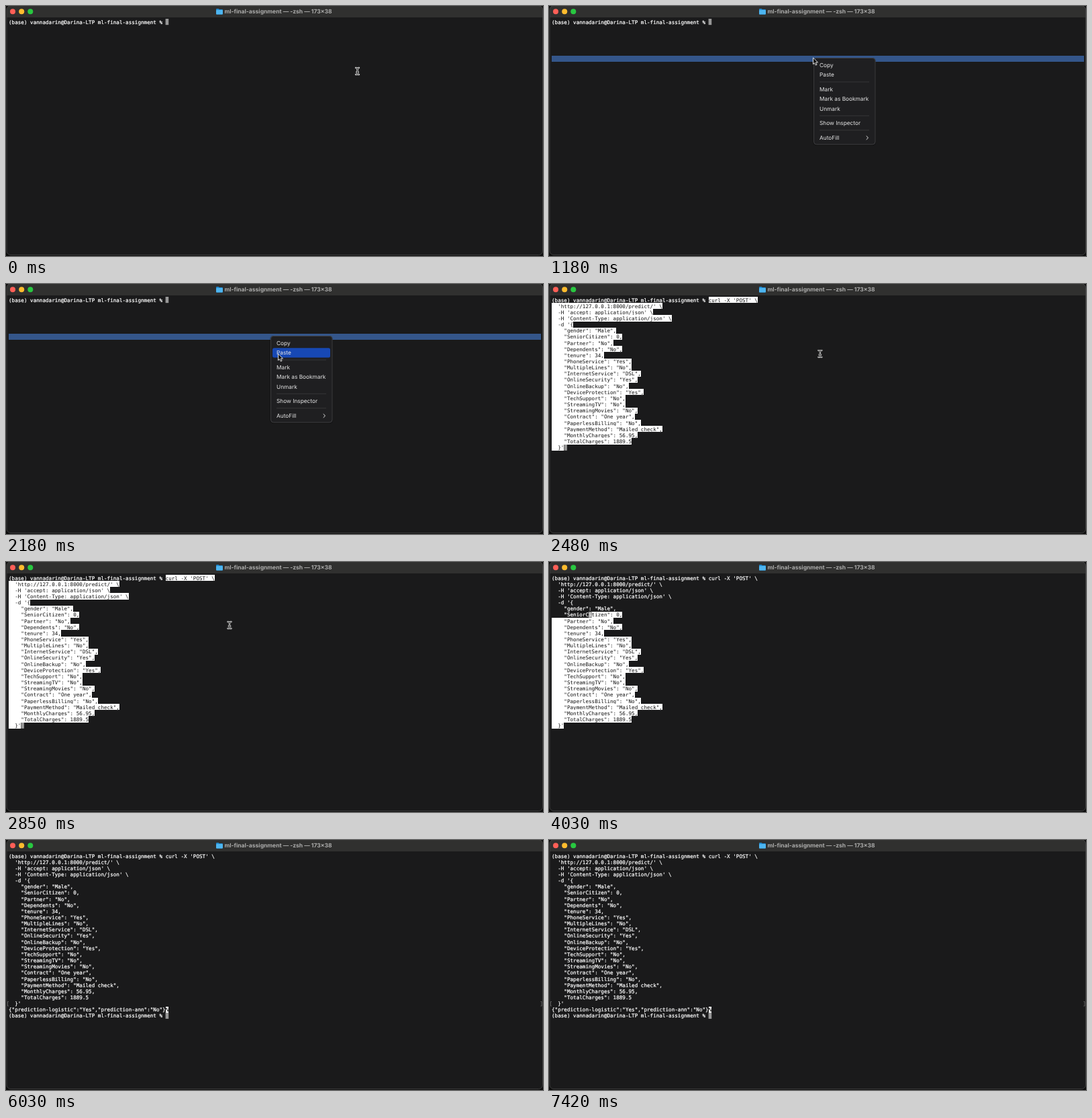
An HTML page for the animation above (7450 ms loop, 800 by 372 pixels).

```html
<!DOCTYPE html>
<html lang="en">
<head>
<meta charset="utf-8">
<title>Terminal</title>
<style>
  html, body { margin: 0; width: 100%; height: 100%; overflow: hidden; background: #0c0c0c; }
  svg { display: block; width: 800px; height: 372px; }
  text { white-space: pre; text-rendering: geometricPrecision; }
  .mono { font: 7.61px "DejaVu Sans Mono", monospace; fill: #fff; }
  .mono text { stroke: #fff; stroke-width: .22px; }
  .mono rect { shape-rendering: crispEdges; }
  .mono .dark { fill: #111; stroke: none; }
  .title { font: 700 8.54px Inter, sans-serif; fill: #acacab; text-anchor: middle; }
  .menu text { font: 8.3px Inter, sans-serif; fill: #e6e6e6; }
</style>
</head>
<body>
<svg viewBox="0 0 800 372">
  <defs>
    <clipPath id="tail"><path id="tailPath"/></clipPath>
  </defs>
  <rect x="1" y="-.5" width="798.5" height="371" rx="6" fill="#1a1a1b"/>
  <path d="M1 17V5.500a6 6 0 0 1 6-6H793.500a6 6 0 0 1 6 6V17Z" fill="#30302f"/>
  <rect x="1" y="-.5" width="798.5" height="371" rx="6" fill="none" stroke="#484848" stroke-width=".8"/>
  <circle cx="10" cy="8.300" r="4" fill="#ff5f57"/>
  <circle cx="23.200" cy="8.300" r="4" fill="#febc2e"/>
  <circle cx="36.300" cy="8.300" r="4" fill="#28c840"/>
  <path d="M313 5.100q0-1 1-1h2.600l1.200 1H322q1 0 1 1v5.400q0 1-1 1h-8q-1 0-1-1Z" fill="#2089cf"/>
  <rect x="313" y="6.100" width="10" height="6.400" rx="1" fill="#4db5f0"/>
  <text class="title" x="405.500" y="11.100">ml-final-assignment — -zsh — 173×38</text>

  <rect id="strip" x="4" y="74" width="793" height="9" fill="#34568a"/>
  <rect id="caret" width="4.600" height="9.150" fill="#979797"/>
  <g id="prompt" class="mono"></g>
  <g id="command" class="mono"></g>
  <g id="pasted" class="mono"></g>
  <path id="marks" d="M4 240.500H2.500V247H4M796.500 240.500H798V247H796.500" fill="none" stroke="#707070" stroke-width=".8"/>
  <g id="reply" class="mono"></g>

  <g id="menu" class="menu">
    <rect x="393" y="77" width="94" height="131" rx="5" fill="#000" opacity=".25"/>
    <rect x="394.500" y="77.500" width="91.500" height="128.500" rx="4" fill="#1f1f21" stroke="#474749" stroke-width=".8"/>
    <rect id="pick" x="397" width="86" height="14.400" rx="2.500" fill="#1748b4"/>
    <path d="M403 113H477M403 163.300H477M403 184.800H477" stroke="#3b3b3d" stroke-width=".8"/>
    <path d="M472.700 193.300L475.500 196.100L472.700 198.900" fill="none" stroke="#e6e6e6"/>
  </g>

  <g id="beam" fill="none" stroke-linecap="round">
    <path d="M-2.500-5Q0-5 0-3.500Q0-5 2.500-5M0-4V4M-2.500 5Q0 5 0 3.500Q0 5 2.500 5M-1.200 1.500H1.200" stroke="#eee" stroke-width="2.300"/>
    <path d="M-2.500-5Q0-5 0-3.500Q0-5 2.500-5M0-4V4M-2.500 5Q0 5 0 3.500Q0 5 2.500 5M-1.200 1.500H1.200" stroke="#111" stroke-width=".8"/>
  </g>
  <path id="arrow" d="M0 0V9.600L2.200 7.600L3.800 11.100L5.500 10.300L4 6.900H7Z" fill="#0a0a0a" stroke="#f4f4f4" stroke-width=".9"/>
</svg>
<script>
const LOOP = 7450, LEFT = 4, TOP = 19, COL = 4.581, ROW = 9.15;
const PROMPT = '(base) vannadarin@Darina-LTP ml-final-assignment % ';
const fields = {
  gender: 'Male', SeniorCitizen: 0, Partner: 'No', Dependents: 'No', tenure: 34,
  PhoneService: 'Yes', MultipleLines: 'No', InternetService: 'DSL',
  OnlineSecurity: 'Yes', OnlineBackup: 'No', DeviceProtection: 'Yes',
  TechSupport: 'No', StreamingTV: 'No', StreamingMovies: 'No',
  Contract: 'One year', PaperlessBilling: 'No', PaymentMethod: 'Mailed check',
  MonthlyCharges: 56.95, TotalCharges: 1889.5
};
const lines = [
  "curl -X 'POST' \\",
  "  'http://127.0.0.1:8000/predict/' \\",
  "  -H 'accept: application/json' \\",
  "  -H 'Content-Type: application/json' \\",
  "  -d '{",
  ...JSON.stringify(fields, null, 4).split('\n').slice(1, -1),
  "  }'"
];

const el = id => document.getElementById(id);
const colX = c => LEFT + c * COL;
const rowY = r => TOP + r * ROW;

function add(parent, tag, attrs, content = '') {
  const node = document.createElementNS('http://www.w3.org/2000/svg', tag);
  for (const name in attrs) node.setAttribute(name, attrs[name]);
  node.textContent = content;
  return parent.appendChild(node);
}
const write = (parent, row, col, str) =>
  add(parent, 'text', { x: colX(col), y: rowY(row) + 7.5 }, str);
function writeInverse(parent, row, col, str) {
  add(parent, 'rect', { x: colX(col), y: rowY(row), width: str.length * COL, height: ROW, fill: '#fff' });
  const text = write(parent, row, col, str);
  text.setAttribute('class', 'dark');
  return text;
}

write(el('prompt'), 0, 0, PROMPT);
lines.forEach((line, row) => {
  const col = row ? 0 : PROMPT.length;
  write(el('command'), row, col, line);
  writeInverse(el('pasted'), row, col, line);
});
write(el('reply'), 25, 0, '{"prediction-logistic":"Yes","prediction-ann":"No"}');
writeInverse(el('reply'), 25, 51, '%').style.fontWeight = 'bold';
write(el('reply'), 26, 0, PROMPT);

const items = { 'Copy': 88, 'Paste': 102.4, 'Mark': 124, 'Mark as Bookmark': 138.4,
  'Unmark': 152.8, 'Show Inspector': 174.4, 'AutoFill': 196 };
for (const name in items) add(el('menu'), 'text', { x: 403, y: items[name] + 3 }, name);

// While the shell redraws, only the part after this cell is still inverted.
el('tailPath').setAttribute('d',
  `M${colX(13)} ${rowY(6)}H800V372H0V${rowY(7)}H${colX(13)}Z`);

// Pointer stops: time, x, y
const stops = [
  [0, 523.5, 97], [210, 393.5, 77.5], [729, 393.5, 77.5], [730, 393.5, 78], [910, 393.5, 77],
  [1300, 393.5, 77], [1700, 405.5, 104], [2450, 405.5, 104], [2800, 333, 94],
  [3150, 333, 94], [3580, 346.5, 211], [LOOP, 346.5, 211]
];
function pointerAt(t) {
  const i = stops.findIndex(s => s[0] > t);
  const [t0, x0, y0] = stops[i - 1], [t1, x1, y1] = stops[i];
  const p = (t - t0) / (t1 - t0), k = p * p * (3 - 2 * p);
  return [x0 + (x1 - x0) * k, y0 + (y1 - y0) * k];
}

const show = (id, on) => el(id).setAttribute('visibility', on ? 'visible' : 'hidden');

function caretAt(t) {
  if (t < 2420) return [0, 51];
  if (t < 4030) return [24, 4];
  if (t < 4060) return [6, 12];
  return t < 4520 ? [25, 0] : [26, 51];
}

function draw(t) {
  const menuOpen = t >= 910 && t < 2420;
  const [x, y] = pointerAt(t);
  const hovered = Object.values(items).find(c => Math.abs(c - y) <= 7.2);
  show('strip', menuOpen);
  show('menu', menuOpen);
  show('pick', menuOpen && hovered && x > 394);
  if (hovered) el('pick').setAttribute('y', hovered - 7.2);
  show('arrow', menuOpen);
  show('beam', !menuOpen && t < 4000);
  for (const id of ['arrow', 'beam']) el(id).setAttribute('transform', `translate(${x} ${y})`);

  show('command', t >= 2420);
  show('pasted', t >= 2420 && t < 4060);
  el('pasted').setAttribute('clip-path', t >= 4030 ? 'url(#tail)' : 'none');
  show('marks', t >= 4060);
  show('reply', t >= 4520);

  const [row, col] = caretAt(t);
  el('caret').setAttribute('x', colX(col));
  el('caret').setAttribute('y', rowY(row));
}

function tick() {
  draw(performance.now() % LOOP);
  requestAnimationFrame(tick);
}
tick();
</script>
</body>
</html>
```
